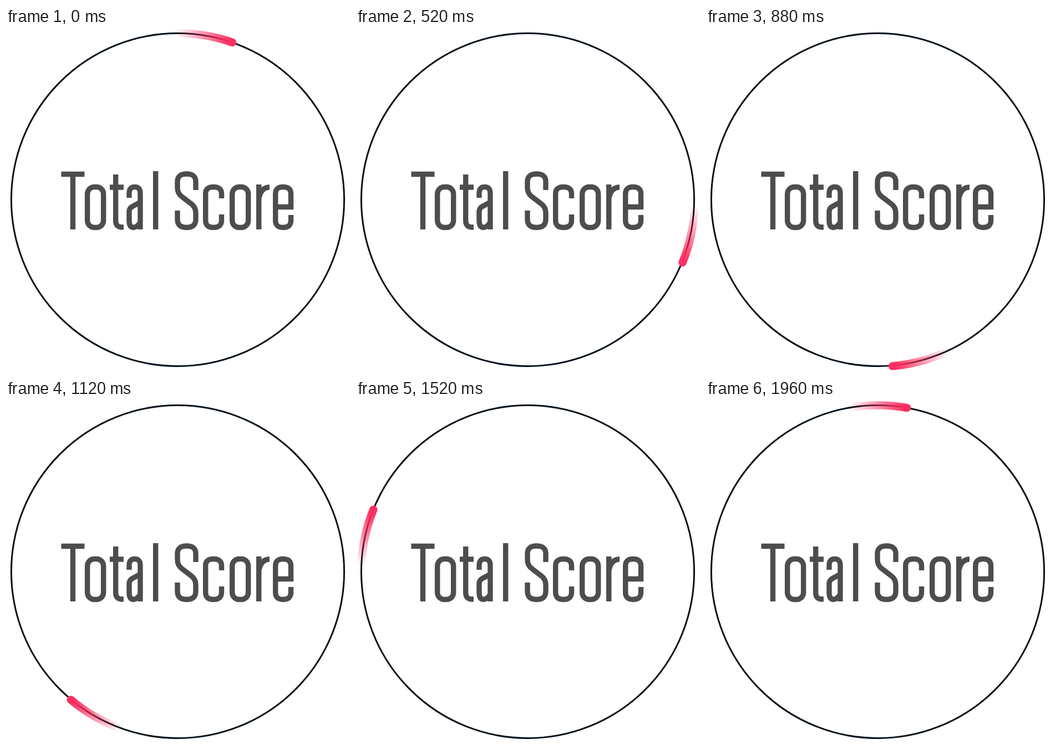
An HTML page with a canvas for the animation above (2 s loop, 620 by 620 pixels).

```html
<!DOCTYPE html>
<html lang="en">
<head>
<meta charset="utf-8">
<title>Total Score</title>
<style>
  html, body { margin: 0; width: 100%; height: 100%; overflow: hidden; background: #fff; }
  svg, canvas { position: absolute; left: 0; top: 0; width: 620px; height: 620px; }
</style>
</head>
<body>
<svg viewBox="0 0 620 620" fill="none" role="img" aria-label="Total Score">
  <circle cx="309.5" cy="309.5" r="300" stroke="#03101a" stroke-width="3"/>
  <!-- condensed lettering, one path per letter -->
  <g stroke="#4d4d4d" stroke-width="9.4">
    <path d="M99.5 263.5H141.5M120.5 263V363"/>
    <rect x="146.7" y="286.5" width="29" height="73" rx="12.5"/>
    <path d="M197.7 264V347Q197.7 359 209 359H212M187 287H212"/>
    <path d="M222 306V298Q222 286.5 232 286.5T242 298V363M242 314L227 322Q222 325 222 331V347Q222 359.5 230 359.5Q236 359.5 242 350"/>
    <path d="M269.7 258V363"/>
    <path d="M342 292V277Q342 263 325.500 263T309 277V288Q309 298 317 304L334 317Q342 323 342 333V345Q342 359.500 325.500 359.500T309 345V329"/>
    <path d="M388.500 307V299Q388.500 286.500 374 286.500T359.700 299V347Q359.700 359.500 374 359.500T388.500 347V336"/>
    <rect x="407.700" y="286.500" width="29" height="73" rx="12.500"/>
    <path d="M455.700 363V282M456 306Q460 287 475 287"/>
    <path d="M486 322.500H513.500V299Q513.500 286.500 499.500 286.500T485.700 299V347Q485.700 359.500 499.500 359.500T513.500 347V337"/>
  </g>
</svg>
<canvas id="stage" width="620" height="620"></canvas>
<script>
  const ctx = document.getElementById('stage').getContext('2d');
  const LOOP = 2000, HOLD = 40, TICKS = 120;
  const START = 19, TAIL = 20 * Math.PI / 180;
  const red = alpha => `rgba(255,45,96,${alpha})`;

  // The head sits at angle 0; the tail fades out behind it.
  const fade = ctx.createConicGradient(-TAIL, 0, 0);
  const headStop = TAIL / (2 * Math.PI);
  fade.addColorStop(0, red(0));
  fade.addColorStop(headStop * 0.92, red(0.96));
  fade.addColorStop(headStop, red(1));
  fade.addColorStop(0.2, red(1));
  fade.addColorStop(0.2, red(0));
  fade.addColorStop(1, red(0));

  function draw(now) {
    const time = Math.floor(now % LOOP / HOLD) * HOLD;
    // The sweep advances in whole ticks of 3 degrees.
    const tick = Math.floor(time * TICKS / LOOP);
    const degrees = START + tick * 360 / TICKS - 90;

    ctx.clearRect(0, 0, 620, 620);
    ctx.save();
    ctx.translate(310, 310);
    ctx.rotate(degrees * Math.PI / 180);
    ctx.beginPath();
    ctx.arc(0, 0, 300.5, -TAIL, 0);
    ctx.lineCap = 'round';
    ctx.lineWidth = 14.5;
    ctx.strokeStyle = fade;
    ctx.stroke();
    ctx.restore();
  }

  const begin = performance.now();
  function loop() {
    draw(performance.now() - begin);
    requestAnimationFrame(loop);
  }
  loop();
</script>
</body>
</html>
```
